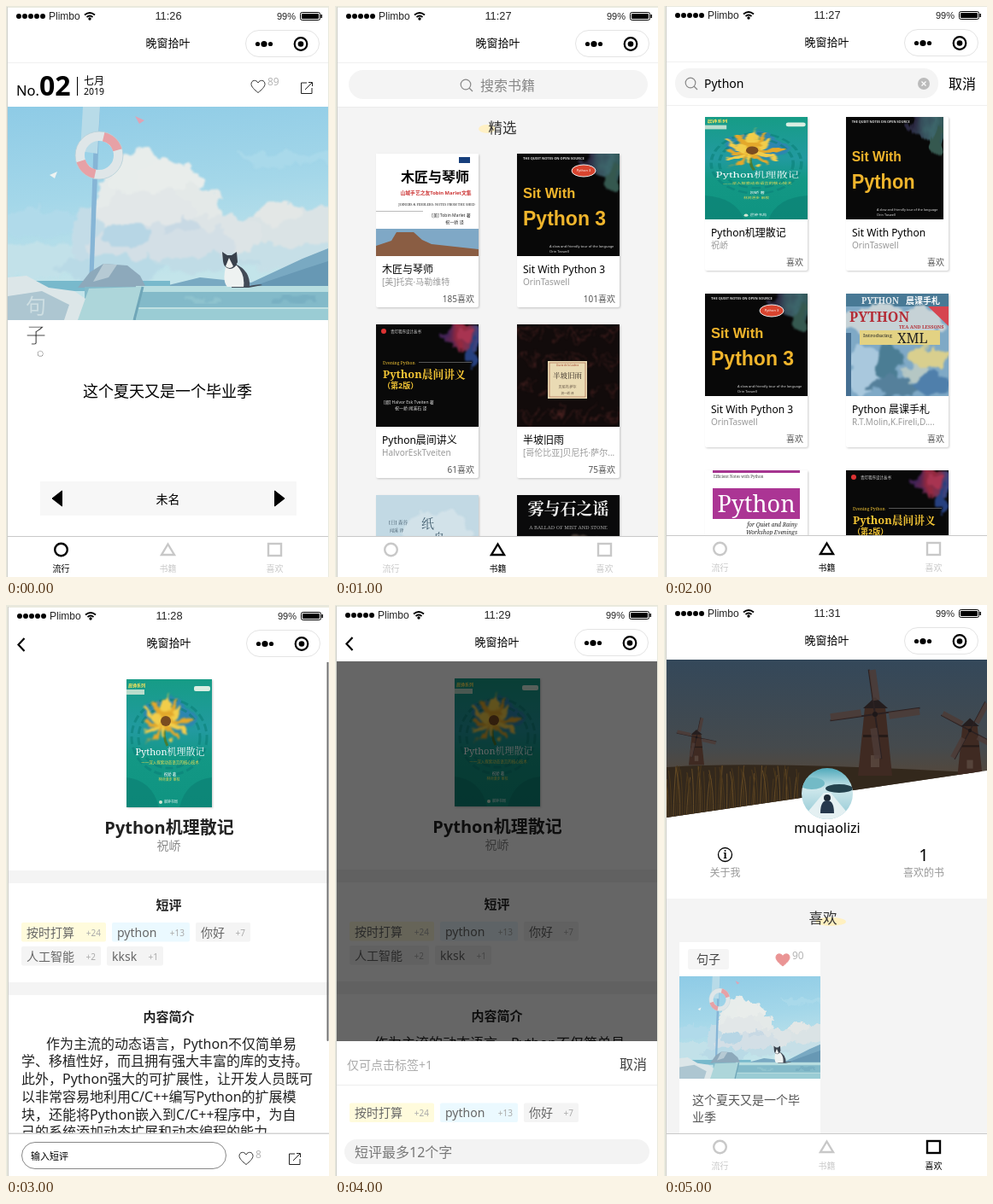
Recreate the animation shown at these times as an HTML page. Size 378 by 669 pixels, loop 6 s.

```html
<!DOCTYPE html>
<html lang="zh-CN">
<head>
<meta charset="utf-8">
<style>
html, body { margin: 0; width: 100%; height: 100%; overflow: hidden; background: #e9e9dd; }
svg { display: block; }
text { font-family: "Noto Sans", "Noto Sans CJK SC", sans-serif; white-space: pre; }
.arial { font-family: "Liberation Sans", Arial, sans-serif; }
.serif { font-family: "Noto Serif", "Noto Serif CJK SC", "Noto Sans CJK SC", serif; }
.thin { stroke: #fff; stroke-width: .8px; }
.faint { opacity: .6; }
.bold { font-weight: 700; }
.mid { text-anchor: middle; }
.end { text-anchor: end; }
.card { filter: drop-shadow(1px 1px 1px #0003); }
</style>
</head>
<body>
<svg id="stage" width="378" height="669" viewBox="0 0 378 669"></svg>
<script>
const rect = (x, y, w, h, fill, rx = 0, extra = '') =>
  `<rect x="${x}" y="${y}" width="${w}" height="${h}" fill="${fill}" rx="${rx}" ${extra}/>`;
const disc = (x, y, r, fill, extra = '') => `<circle cx="${x}" cy="${y}" r="${r}" fill="${fill}" ${extra}/>`;
const oval = (x, y, rx, ry, fill, extra = '') =>
  `<ellipse cx="${x}" cy="${y}" rx="${rx}" ry="${ry}" fill="${fill}" ${extra}/>`;
const shape = (d, fill, extra = '') => `<path d="${d}" fill="${fill}" ${extra}/>`;
const line = (d, stroke, width = 1, extra = '') =>
  `<path d="${d}" fill="none" stroke="${stroke}" stroke-width="${width}" ${extra}/>`;
// y is the middle of the capitals
const text = (x, y, size, str, fill = '#000', cls = '') =>
  `<text x="${x}" y="${(y + size * .36).toFixed(2)}" font-size="${size}" fill="${fill}" class="${cls}">${str}</text>`;
const picture = (x, y, w, h, vw, vh, body) =>
  `<svg x="${x}" y="${y}" width="${w}" height="${h}" viewBox="0 0 ${vw} ${vh}" preserveAspectRatio="none">${body}</svg>`;
const painted = body => `<g filter="url(#brush)">${body}</g>`;
const gradient = (id, dir, ...stops) => `<linearGradient id="${id}" x1="0" y1="0" x2="${dir[0]}" y2="${dir[1]}">` +
  stops.map(([at, c]) => `<stop offset="${at}" stop-color="${c}"/>`).join('') + '</linearGradient>';

const defs = '<defs>' +
  gradient('sky', [.15, 1], [0, '#8ecbe6'], [.45, '#a4d7e9'], [.85, '#c3e4ea']) +
  gradient('dusk', [0, 1], [0, '#34485a'], [.55, '#454a4d'], [.75, '#55473a'], [1, '#2b2014']) +
  gradient('jade', [0, 1], [0, '#169c86'], [.4, '#229aa0'], [.6, '#139885'], [1, '#0f9481']) +
  gradient('glow', [1, 0], [0, '#3a2258'], [.4, '#96293f'], [1, '#27498c']) +
  gradient('mist', [1, 0], [0, '#2a2640'], [.5, '#3d666b'], [1, '#2c4d4d']) +
  gradient('snow', [0, 1], [0, '#4fa9bb'], [.4, '#cfe8ec'], [1, '#8fc7d3']) +
  '<filter id="brush" x="-20%" y="-20%" width="140%" height="140%" color-interpolation-filters="sRGB">' +
  '<feTurbulence type="fractalNoise" baseFrequency=".05" numOctaves="3" seed="4"/>' +
  '<feDisplacementMap in="SourceGraphic" scale="26" xChannelSelector="R" yChannelSelector="G"/><feGaussianBlur stdDeviation=".8"/></filter>' +
  '<clipPath id="avatar"><circle cx="190" cy="223" r="30"/></clipPath>' +
  '<clipPath id="banner"><path d="M2 66H377V196L2 251Z"/></clipPath></defs>';

// icons
const heart = (x, y, fill, stroke) => shape(
  'M0 7C-4 4-8 0-8-3C-8-8-2-8.500 0-4.500C2-8.500 8-8 8-3C8 0 4 4 0 7Z', fill,
  `stroke="${stroke}" transform="translate(${x} ${y})"`);
const share = (x, y) => line(`M${x + 7} ${y + 1}H${x + .5}V${y + 13.500}H${x + 13}V${y + 7}M${x + 5} ${y + 9}L${x + 13} ${y + 1}M${x + 9} ${y + .5}H${x + 13.500}V${y + 5}`, '#222');
const magnifier = (x, y) => disc(x - 1, y - 1, 5.800, 'none', 'stroke="#888" stroke-width="1.200"') +
  line(`M${x + 3} ${y + 3}l4 4`, '#888', 1.200);

function chrome(clock, back) {
  let out = rect(2, 2, 375, 64, '#fff');
  for (let i = 0; i < 5; i++) out += disc(15 + i * 7, 12, 3, '#000');
  out += text(50, 12, 12, 'Plimbo', '#222', 'arial');
  out += line('M92 10.500Q98 5.500 104 10.500M94.500 13Q98 10 101.500 13', '#000', 1.800) + disc(98, 15, 1.700, '#000');
  out += text(190, 11.500, 12.800, clock, '#222', 'arial mid') + text(317, 12, 11, '99%', '#222', 'arial');
  out += rect(344.5, 7.500, 23, 9, '#fff', 2, 'stroke="#000"') + rect(346, 9, 20, 6, '#000', 1) + rect(368.5, 10, 1.500, 4, '#000');
  out += text(189.5, 43, 13, '晚窗拾叶', '#000', 'mid');
  out += rect(280.5, 28.500, 86, 31, '#fff', 15.500, 'stroke="#e4e4e4"');
  out += disc(294.5, 44.500, 2.600, '#000') + disc(302, 44.500, 3.600, '#000') + disc(309.5, 44.500, 2.600, '#000');
  out += disc(345, 44.500, 7.300, 'none', 'stroke="#000" stroke-width="2.200"') + disc(345, 44.500, 3.300, '#000');
  return out + (back ? line('M20.500 38L13.500 45.500L20.500 53', '#000', 2.200) : '');
}

function tabs(active) {
  const tint = i => i === active ? '#000' : '#c8c8c8';
  const pen = i => `stroke="${tint(i)}" stroke-width="2.400"`;
  return rect(2, 621, 375, 60, '#fff') + rect(2, 621, 375, 1, '#c9c9c9') +
    disc(64.5, 637, 7.300, 'none', pen(0)) +
    shape('M189.500 630.500L197 643H182Z', 'none', pen(1)) +
    rect(307, 630, 15, 14, 'none', 0, pen(2)) +
    ['流行', '书籍', '喜欢'].map((s, i) => text(64.5 + i * 125, 659.500, 10, s, tint(i), 'mid')).join('');
}

function seaside() {
  const clouds = [
    [330, 60, 60, 8, '#a9d9ea'], [40, 135, 50, 14, '#b0daea'], [45, 180, 75, 20, '#c2e1e9'],
    [320, 165, 85, 28, '#c6dfe7'], [335, 140, 62, 24, '#dae3e5'], [318, 124, 28, 12, '#e3e7e6'],
    [120, 155, 50, 45, '#c3dce7'], [128, 110, 26, 36, '#e6ebea'], [152, 80, 30, 28, '#e8edeb'],
    [188, 92, 38, 32, '#e9edeb'], [218, 120, 36, 28, '#e4e9e8'], [165, 130, 58, 32, '#e2e7e8'],
    [248, 150, 50, 22, '#dde4e6'], [180, 162, 85, 26, '#d3dfe6'], [140, 150, 30, 14, '#b7d6e5'],
    [205, 140, 24, 8, '#c8d9e4'], [120, 190, 60, 16, '#b9dae6'], [230, 185, 60, 10, '#c0dce6']];
  return rect(0, 0, 375, 250, 'url(#sky)') + painted(clouds.map(c => oval(...c)).join('')) +
    shape('M180 211L225 200L285 206L345 178L375 166V212H180Z', '#79a9c2') +
    shape('M285 211L350 189L375 181V212Z', '#6798b4') +
    rect(0, 204, 190, 12, '#78b9cc') +
    shape('M102 0H108L100 212H95Z', '#86b5d6') + shape('M88 0H108L105 55L85 52Z', '#b8dbe8') +
    disc(107, 57, 22.500, 'none', 'stroke="#dfe6e8" stroke-width="11"') +
    disc(107, 57, 22.500, 'none', 'stroke="#e7a1a6" stroke-width="11" stroke-dasharray="23.500 47.200" stroke-dashoffset="-40"') +
    disc(107, 57, 28, 'none', 'stroke="#b4d0d8" stroke-width=".8"') +
    shape('M149 11L160 16L154 20Z', '#dfa3b4') + shape('M49 80L58 76L55 84Z', '#eef3f2') +
    shape('M82 212L96 194L112 184L140 186L155 198L162 212Z', '#8da9bb') + shape('M112 184L128 185L118 200L100 205Z', '#b6cad4') +
    rect(90, 211, 285, 39, '#83bac9') + rect(150, 210, 225, 7, '#b7dde0') + rect(150, 236, 225, 14, '#9accd4') +
    rect(150, 235, 225, 2, '#bfe0e2') + painted(rect(205, 222, 45, 6, '#8fc3ce') + rect(310, 222, 50, 7, '#78b0c2')) +
    shape('M0 200L22 198L48 212L78 216L94 227L82 250H0Z', '#dce6e8') + shape('M0 222L40 216L72 232L66 250H0Z', '#adc6d1') +
    shape('M95 213L158 211L148 250H82Z', '#add6da') + line('M158 211L148 250', '#6fa6b8', 3) +
    shape('M266 184Q284 192 283 210Q296 207 298 209L282 212H262Z', '#424b57') +
    shape('M255 188Q251 205 257 211H276Q278 196 268 186Z', '#eef2f1') +
    shape('M252 181L251 170L257 174H262L268 170L269 182Q266 190 260 190Q253 189 252 181Z', '#39414c') +
    shape('M259 177L264 187Q260 191 255 187Z', '#f1f2f0');
}

// book covers, drawn in 120 x 120 units
const plain = body => ({ w: 120, box: [120, 120], body });
const craft = plain(rect(0, 0, 120, 120, '#fff') + rect(97, 4, 13, 7, '#173f7c') +
  text(69, 27, 16, '木匠与琴师', '#000', 'bold mid') + text(70, 46, 5.800, '山城手艺之友Tobin Marlet文集', '#c33', 'bold mid') +
  text(71, 60, 4, 'JOINERS &amp; FIDDLERS: NOTES FROM THE SHED', '#222', 'serif mid') +
  text(88, 72, 5, '[美] Tobin Marlet 著', '#222', 'mid') + text(92, 80, 5, '祝一峤 译', '#222', 'mid') +
  rect(0, 67, 55, 1, '#bbb') + rect(0, 88, 120, 32, '#7fa8c6') +
  shape('M0 120V108L18 102L24 92H44L54 101L65 106L120 112V120Z', '#8a5d43'));

const walk = (word, w) => ({ w, box: [120, 120], body: rect(0, 0, 120, 120, '#080808') +
  painted(oval(104, 10, 24, 22, 'url(#mist)') + oval(112, 30, 10, 14, '#35584f')) +
  text(7, 6, 4, 'THE QUIET NOTES ON OPEN SOURCE', '#ddd', 'bold') +
  (word.endsWith('3') ? oval(78, 20, 14, 7, '#d8442f', 'stroke="#eee"') + text(78, 20, 4, 'Python 3', '#fff', 'mid') : '') +
  text(7, 46, 16.500, 'Sit With', '#f0b52c', 'arial bold') + text(7, 76, 23, word, '#f0b52c', 'arial bold') +
  text(38, 109, 4, 'A slow and friendly tour of the language', '#ddd') + text(38, 115, 4, 'Orin Taswell', '#ddd') });

const lessons = plain(rect(0, 0, 120, 120, '#090909') +
  painted(oval(102, 16, 22, 18, 'url(#glow)') + oval(113, 34, 6, 16, '#26407f') + disc(104, 12, 7, '#a83451')) +
  disc(9, 8, 3, '#d33') + text(17, 8, 4.500, '青灯程序设计丛书', '#ddd') +
  text(8, 45, 5, 'Evening Python', '#f3c535', 'serif') + rect(50, 44, 62, .7, '#777') +
  text(8, 58, 12.800, 'Python晨间讲义', '#f3c535', 'serif bold') + text(8, 72, 9, '（第2版）', '#f3c535', 'bold') +
  text(9, 91, 5, '[挪] Halvor Esk Tveiten 著', '#ddd') + text(22, 98, 5, '祝一峤 闻溪石 译', '#ddd'));

const vines = Array.from({ length: 16 }, (_, i) => {
  const x = (i % 4) * 32 + 8, y = (i >> 2) * 32 + 8;
  return line(`M${x - 14} ${y + 10}q8-22 16-8t14-10m-12 4c8 2 10 12 2 14s-12-10-2-14`, '#5a2927', .8);
}).join('');
const rain = plain(rect(0, 0, 120, 120, '#120b0b') + painted(vines) + rect(36, 43, 46, 44, '#eadbb4') +
  rect(38, 45, 42, 40, 'none', 0, 'stroke="#a35c40" stroke-width=".6"') +
  text(59, 60, 8.500, '半坡旧雨', '#2b211c', 'serif mid') + text(59, 48, 3, 'Lluvia de la Ladera', '#a34530', 'mid') +
  text(59, 74, 4, '贝尼托·萨尔', '#5c4b3d', 'mid') + text(59, 81, 3.500, '祝一峤 译', '#5c4b3d', 'mid'));
const boat = plain(rect(0, 0, 120, 120, '#c2d9e4') + painted(oval(70, 60, 44, 42, '#d2e2e9')) +
  text(15, 32, 5.500, '[日] 森谷', '#405868', 'serif') + text(16, 41, 5, '闻溪 译', '#405868', 'serif') +
  text(53, 34, 15, '纸', '#435f70', 'serif') + text(66, 51, 15, '舟', '#435f70', 'serif'));
const ballad = plain(rect(0, 0, 120, 120, '#0a0a0b') + text(60, 16, 19, '雾与石之谣', '#f2f2f2', 'serif bold mid') +
  text(60, 38, 6, 'A BALLAD OF MIST AND STONE', '#aaa', 'serif mid') + painted(oval(68, 52, 22, 6, '#4d423a')));

const petals = Array.from({ length: 12 }, (_, i) =>
  oval(45, 33, 3.300, 14, i % 2 ? '#e3a82b' : '#f2cd4a', `transform="rotate(${i * 30} 45 47)"`)).join('');
const jade = { w: 120, box: [100, 150], body: rect(0, 0, 100, 150, 'url(#jade)') +
  painted(oval(50, 42, 30, 20, '#2d86b0')) +
  [44, 36].map(r => disc(50, 68, r, 'none', 'stroke="#0b8078" stroke-width="3" stroke-dasharray="9 4" opacity=".6"')).join('') +
  shape('M0 115Q30 118 38 150H0ZM100 115Q70 118 62 150H100Z', '#0b7a70', 'opacity=".5"') +
  line('M45 50Q42 68 48 78', '#487c33', 3) + painted(petals) + disc(46, 49, 6, '#7a4c20') +
  text(2, 7, 5, '晨钟系列', '#ffe55a', 'bold') + rect(0, 12, 21, 6, '#b9dccc') + rect(79, 8, 19, 6, '#d9eee2', 2) +
  text(51, 85, 11, 'Python机理散记', '#fff', 'serif mid') + text(51, 97, 4.500, '——深入探索动态语言的核心技术', '#f0de55', 'mid') +
  text(51, 111, 4.500, '祝峤 著', '#fff', 'mid') + text(50, 118, 4, '林间漫步 审校', '#f0de55', 'mid') +
  disc(40, 144, 2, '#d4e7d4') + text(44, 144, 4, '晨钟书局', '#fff') };

const tea = plain(rect(0, 0, 120, 120, '#7fa9c6') + rect(0, 0, 120, 15, '#487995') +
  painted(oval(55, 34, 62, 20, '#c6d2d6') + oval(20, 90, 20, 30, '#a9c8dd') + oval(95, 75, 22, 14, '#d9cf8e') +
    oval(50, 82, 16, 20, '#4b7d94') + oval(60, 108, 34, 10, '#55809b') + oval(102, 105, 18, 12, '#4f7fab') + oval(80, 92, 12, 9, '#b5c7c4')) +
  text(18, 8, 10, 'PYTHON', '#e6edf0', 'serif bold') + text(70, 8, 10, '晨课手札', '#fff', 'bold') +
  text(4, 27, 16, 'PYTHON', '#b42c36', 'serif bold') + text(62, 39, 5.500, 'TEA AND LESSONS', '#b42c36', 'serif bold') +
  shape('M96 15H120V38Z', '#d64550') + rect(16, 43, 94, 17, '#e3d283') +
  text(20, 49, 6, 'Introducing', '#222', 'serif') + text(60, 52, 16, 'XML', '#222', 'serif') + rect(0, 46, 6, 74, '#456f92'));
const shed = plain(rect(0, 0, 120, 120, '#fff') + rect(9, 0, 102, 3, '#a53590') +
  text(10, 7, 4.500, 'Efficient Notes with Python', '#444', 'serif') + rect(9, 21, 102, 36, '#ab3594') +
  text(60, 39, 27, 'Python', '#fff', 'serif mid') +
  `<g font-style="italic">${text(108, 64, 6.500, 'for Quiet and Rainy', '#222', 'serif end')}${text(108, 73, 6.500, 'Workshop Evenings', '#222', 'serif end')}</g>`);

const walk3 = [walk('Python 3', 120), 'Sit With Python 3', 'OrinTaswell', 101];
const basics = [lessons, 'Python晨间讲义', 'HalvorEskTveiten', 61];
const shelf = [[craft, '木匠与琴师', '[美]托宾·马勒维特', 185], walk3, basics,
  [rain, '半坡旧雨', '[哥伦比亚]贝尼托·萨尔...', 75], [boat, '', '', ''], [ballad, '', '', '']];
const results = [[jade, 'Python机理散记', '祝峤'], [walk('Python', 114), 'Sit With Python', 'OrinTaswell'], walk3,
  [tea, 'Python 晨课手札', 'R.T.Molin,K.Fireli,D....'], [shed, '', ''], basics];

const books = (list, top, pitch, counted) => list.map(([cover, title, author, likes], i) => {
  const x = 47 + (i % 2) * 165, y = top + (i >> 1) * pitch;
  return rect(x, y, 120, 180, '#fff', 2, 'class="card"') + picture(x, y, cover.w, 120, ...cover.box, cover.body) +
    text(x + 7, y + 136, 12, title) + text(x + 7, y + 150.500, 10, author, '#999') +
    text(x + 115, y + 170, 10, (counted ? likes : '') + '喜欢', '#555', 'end');
}).join('');

const tag = (x, y, w, fill, label, count) => rect(x, y, w, 22.500, fill, 2) +
  text(x + 6, y + 11.500, 14, label, '#666') + text(x + w - 6, y + 12, 10, '+' + count, '#aaa', 'end');
const mainTags = y => tag(17, y, 99, '#fffbdc', '按时打算', 24) + tag(123, y, 91, '#ebf9ff', 'python', 13) +
  tag(221, y, 64, '#f4f4f4', '你好', 7);

function detail() {
  const lines = ['学、移植性好，而且拥有强大丰富的库的支持。', '此外，Python强大的可扩展性，让开发人员既可',
    '以非常容易地利用C/C++编写Python的扩展模', '块，还能将Python嵌入到C/C++程序中，为自', '己的系统添加动态扩展和动态编程的能力。'];
  return rect(140, 86, 100, 150, '#0d8072', 0, 'class="card"') + picture(140, 86, 100, 150, 100, 150, jade.body) +
    text(190, 260, 20, 'Python机理散记', '#222', 'bold mid') + text(189.5, 281, 14, '祝峤', '#888', 'mid') +
    rect(2, 310, 375, 15, '#f4f4f4') + text(189.5, 351, 15, '短评', '#222', 'bold mid') + mainTags(371) +
    tag(17, 399, 93, '#f4f4f4', '人工智能', 2) + tag(117, 399, 66, '#f4f4f4', 'kksk', 1) +
    rect(2, 441, 375, 15, '#f4f4f4') + text(189.5, 482, 15, '内容简介', '#222', 'bold mid') +
    text(46, 513, 16, '作为主流的动态语言，Python不仅简单易', '#222') +
    lines.map((s, i) => text(17, 533.700 + i * 20.700, 16, s, '#222')).join('');
}

function mill(x, y, size, tilt) {
  let out = shape('M-12-8L0-16L12-8L20 72H-20Z', '#3f2a22') + shape('M-14-7L0-20L15-7Z', '#241d1e') +
    rect(-14, 24, 29, 3, '#261b18') + rect(-5, 48, 10, 14, '#55433a');
  for (let a = 0; a < 360; a += 90) out += `<g transform="rotate(${a + tilt})">` +
    line('M0 0V-53', '#2a2021', 2) + rect(0, -52, 8, 36, '#4d3b37', 0, 'opacity=".85"') + '</g>';
  return `<g transform="translate(${x} ${y}) scale(${size})">${out}${disc(0, 0, 3, '#1d1718')}</g>`;
}

function windmills() {
  let grass = '';
  for (let i = 0; i < 60; i++) {
    const x = 2 + i * 2.600, h = 14 + 16 * Math.abs(Math.sin(i * 12.9));
    grass += line(`M${x} 252Q${x + 1} ${230 - h / 2} ${x + 5 * Math.sin(i * 5)} ${220 - h}`, i % 3 ? '#4b371b' : '#644a25');
  }
  return `<g clip-path="url(#banner)">${rect(2, 66, 375, 186, 'url(#dusk)')}${shape('M2 192Q110 184 377 199V251H2Z', '#33281c')}` +
    mill(37, 157, .45, 12) + mill(246, 130, 1, -8) + mill(357, 149, .72, 28) + grass + '</g>';
}

const avatar = `<g clip-path="url(#avatar)">${rect(160, 193, 60, 60, 'url(#snow)')}` +
  oval(172, 211, 15, 7, '#73bac6') + oval(204, 217, 16, 5, '#23414d') + shape('M160 253L186 222H194L220 253Z', '#e4f0f2') +
  disc(190, 228, 4, '#1d2a37') + shape('M182 246Q182 231 190 231Q198 231 198 246Z', '#25384c') + '</g>';

const pages = [
  { clock: '11:26', shift: [0, 0], tab: 0, body: rect(2, 66, 375, 1, '#f0f0f0') +
    text(12, 99, 16.500, 'No.') + text(39, 93.500, 32, '02', '#000', 'bold') + rect(83, 83, 1, 22, '#000') +
    text(91, 87.500, 12, '七月') + text(91, 100, 10.500, '2019') + heart(295, 94.500, 'none', '#333') +
    text(306, 88.500, 12, '89', '#b5b5b5') + share(345, 89) + picture(2, 118, 375, 250, 375, 250, seaside()) +
    text(35, 351, 24, '句', '#e3eeee', 'faint mid') + text(35, 385, 24, '子', '#333', 'thin mid') + text(35.5, 400.500, 24, '。', '#333', 'thin') +
    text(189, 452, 18, '这个夏天又是一个毕业季', '#000', 'mid') + rect(40, 557, 300, 40, '#f7f7f7') +
    shape('M54 577L65.500 568V586Z', '#000', 'stroke="#000" stroke-linejoin="round"') +
    shape('M326 577L314.500 568V586Z', '#000', 'stroke="#000" stroke-linejoin="round"') + text(189.5, 578, 14, '未名', '#000', 'mid') },

  { clock: '11:27', shift: [1, 0], tab: 1, body: rect(2, 66, 375, 1, '#f0f0f0') + rect(2, 118, 375, 510, '#f4f4f4') + rect(2, 118, 375, 1, '#ebebeb') +
    rect(15, 75, 350, 34, '#f4f4f4', 17) + magnifier(153, 93) + text(169, 93.500, 16, '搜索书籍', '#888') +
    oval(177, 144, 10, 5, '#fff0c4') + text(178.5, 143.500, 16.500, '精选', '#333') + books(shelf, 173, 200, true) },

  { clock: '11:27', shift: [1, -1], tab: 1, body: rect(2, 66, 375, 1, '#f0f0f0') + rect(2, 117, 375, 1, '#f0f0f0') +
    rect(12, 74, 308, 35, '#f4f4f4', 17) + magnifier(31, 92) + text(46, 92, 14, 'Python') + disc(303, 92, 7, '#bbb') +
    line('M300.500 89.500l5 5m0-5l-5 5', '#fff', 1.200) + text(332, 92, 16, '取消') + books(results, 131, 207, false) },

  { clock: '11:28', shift: [1, 1], back: true, body: detail() + rect(374.5, 65, 2, 445, '#707070', 1) +
    rect(2, 618, 375, 60, '#fff') + rect(2, 617.5, 375, 1.500, '#d2d2d2') +
    rect(17.5, 628.500, 239, 31, '#fff', 15.500, 'stroke="#888"') + text(28, 645.500, 11, '输入短评') +
    heart(280, 647.500, 'none', '#333') + text(291, 642.500, 12, '8', '#b5b5b5') + share(330, 641) },

  { clock: '11:29', shift: [0, 0], back: true, body: detail() + rect(2, 66, 375, 603, '#000', 0, 'opacity=".6"') +
    rect(2, 511, 375, 158, '#fff') + text(14, 538.500, 14, '仅可点击标签+1', '#aaa') + text(333, 538.500, 16, '取消', '#444') +
    rect(2, 562, 375, 1, '#eee') + mainTags(583.5) + rect(11, 626, 357, 29, '#f3f3f3', 14.500) + text(23, 641, 16, '短评最多12个字', '#777') },

  { clock: '11:31', shift: [1, -2], tab: 2, body: windmills() + avatar + text(190, 263.500, 16, 'muqiaolizi', '#000', 'mid') +
    disc(70.5, 294.500, 8, 'none', 'stroke="#000" stroke-width="1.300"') + text(70.5, 294.500, 12, 'i', '#000', 'serif bold mid') +
    text(70.5, 315.500, 12, '关于我', '#999', 'mid') + text(303, 295, 20, '1', '#000', 'mid') + text(303, 315.500, 12, '喜欢的书', '#999', 'mid') +
    rect(2, 346, 375, 290, '#f4f4f4') + oval(194, 373, 18, 5, '#fff0c0') + text(185, 369, 16.500, '喜欢', '#333', 'mid') +
    rect(17, 397, 165, 260, '#fff') + rect(27, 405, 48, 24, '#f5f5f5', 3) + text(51, 417, 14, '句子', '#444', 'mid') +
    heart(138, 418, '#ea9494', '#ea9494') + text(149, 413, 12, '90', '#b5b5b5') +
    picture(17, 437, 165, 120, 375, 250, seaside()) + text(32, 582, 14, '这个夏天又是一个毕', '#555') + text(32, 602, 14, '业季', '#555') },
];

const stage = document.getElementById('stage');
stage.innerHTML = defs + pages.map(({ clock, shift, tab, back, body }) =>
  `<g class="page" transform="translate(${shift})">${rect(2, 2, 375, 680, '#fff')}${rect(1, 1, 1, 680, '#cfcfc9')}` +
  body + chrome(clock, back) + (tab === undefined ? '' : tabs(tab)) + '</g>').join('');
const layers = stage.querySelectorAll('.page');

function draw() {
  const current = Math.floor(performance.now() / 1000) % pages.length;
  layers.forEach((layer, i) => { layer.style.visibility = i === current ? 'visible' : 'hidden'; });
  requestAnimationFrame(draw);
}
draw();
</script>
</body>
</html>
```
